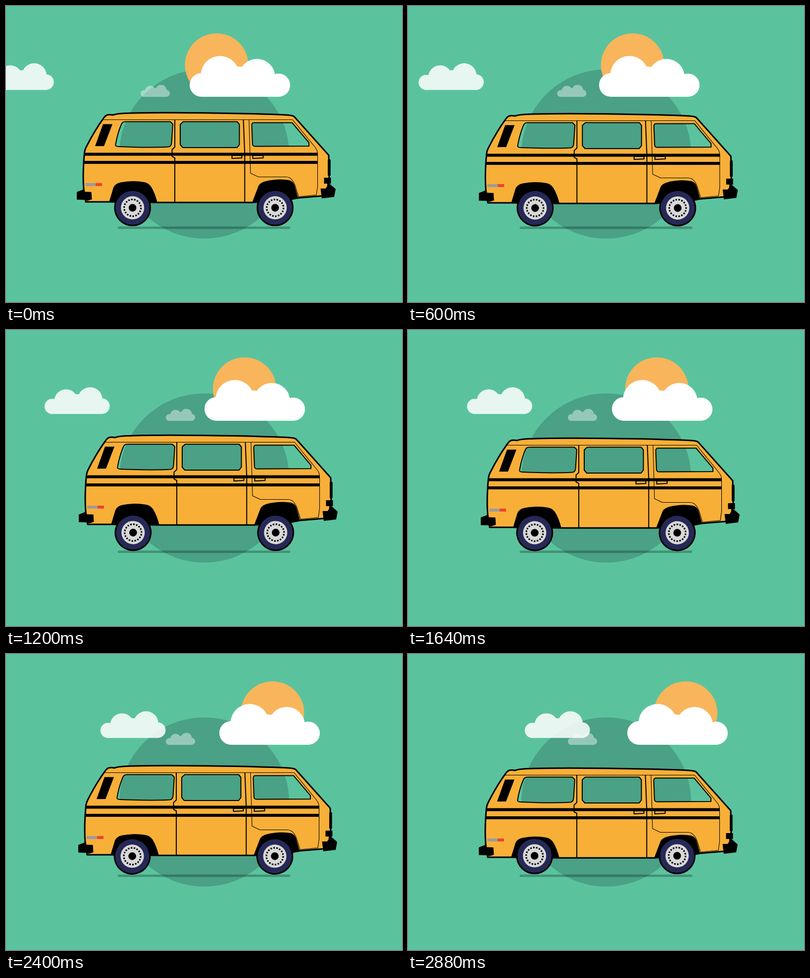
Write an HTML page that moves like this. It is 800 px wide and 600 px high and loops after 2920 ms.

```html
<!DOCTYPE html>
<html lang="en">
<head>
<meta charset="utf-8">
<title>Van ride</title>
<style>
  html, body { margin: 0; width: 100%; height: 100%; overflow: hidden; background: #5ac39e; }
  svg { display: block; width: 800px; height: 600px; }
  .line { fill: none; stroke: #000; stroke-width: 2; stroke-linejoin: round; }
  .thin { stroke-width: 1.1; }
  .bold { stroke-width: 3; }
</style>
</head>
<body>
<svg viewBox="0 0 800 600">
  <defs>
    <g id="puff">
      <rect x="15" y="25" width="101.500" height="29.500" rx="0"/>
      <circle cx="15.300" cy="39.200" r="15.300"/>
      <circle cx="43.500" cy="28.500" r="24"/>
      <circle cx="92" cy="25.300" r="25"/>
      <circle cx="115.700" cy="38.600" r="15.900"/>
      <rect x="55" y="14.500" width="25" height="30"/>
    </g>
    <g id="wheel">
      <circle r="35.800" fill="#262956" stroke="#000" stroke-width="3"/>
      <circle r="23.500" fill="#d8d8d8"/>
      <circle r="17" fill="none" stroke="#000" stroke-width="3.200" pathLength="108" stroke-dasharray="3.200 2.800"/>
      <circle r="7.800"/>
    </g>
  </defs>

  <circle cx="400.500" cy="300" r="171.500" fill="#4aa186"/>
  <circle id="sun" cy="119.500" r="64" fill="#f8b55b"/>
  <g id="bigCloud" fill="#fff">
    <rect x="24" y="150" width="156" height="34"/>
    <circle cx="24" cy="160" r="24"/>
    <circle cx="61.300" cy="140" r="38.800"/>
    <circle cx="136" cy="144" r="36.800"/>
    <circle cx="179.500" cy="160.500" r="23.500"/>
    <path d="M80 123L98 122.500L120 125V160H80Z"/>
  </g>
  <g id="paleCloud" fill="#fff" opacity=".86"><use href="#puff"/></g>
  <g id="tinyCloud" fill="#fff" opacity=".42"><use href="#puff" transform="scale(.449)"/></g>

  <path d="M228 449.500H572" stroke="#000" stroke-opacity=".25" stroke-width="5" stroke-linecap="round"/>

  <g id="van">
    <path id="shell" fill="#f7af38" fill-rule="evenodd"/>
    <path id="outline" class="line bold"/>
    <path d="M208 398L217 368Q220 360 232 357.500Q256 353 279 357Q287 358 293 366Q301 379 306 399Z"/>
    <path d="M497 399L510 365Q513 358 525 355Q550 349 572 353Q580 355 583 364L590 389L575 392Z"/>
    <path id="glass" class="line"/>
    <path class="line thin" d="M195 230.500H579L625 287Q629.500 292 629.500 302V365L627 383L591 386.500L584 364Q578 347 566 346.500H510L494 339L491 231"/>
    <path class="line" d="M341 230V286L335.500 291V305L341 308V398M479.500 230L482.300 300V398"/>
    <path d="M158 300.500H630M157 317H630" stroke="#000" stroke-width="6"/>
    <path class="line" d="M456.500 303H476.500V308L456.500 309ZM498.500 303H519.500V308L498.500 309Z"/>
    <path d="M196 239.500H215L198 284H180Z"/>
    <path d="M160 359H181V365H160Z" fill="#9c9c9c"/>
    <path d="M181 359H194V365H181Z" fill="#f0432f"/>
    <path d="M143 377L156 372L158 376.500L172.500 377L173.500 392L164 395L160 393L143 392.500Z"/>
    <path d="M635.500 370H649L649 360H653.500L666 371L663 387L638 390Z"/>
    <path d="M642.500 348H656.500V360H642.500Z"/>
    <rect x="650" y="310.500" width="5.700" height="34" rx="2"/>
  </g>
  <use href="#wheel" class="wheel"/>
  <use href="#wheel" class="wheel"/>
</svg>
<script>
  const LOOP = 2920, STEP = 40, TURN = 2880;
  const get = id => document.getElementById(id);

  const hull = 'M161 397L157 371Q154.500 340 158.500 297Q159 292 162 286Q178 254 196 229Q201 221 206 220.500Q211 220 216 221Q224 218 240 217.500Q300 215.500 400 216.800Q500 218 560 220.500Q578 221 582 224L652 302.500L653 345L650 366L638 385L590 389L575 392L498 398.300H306L208 397Z';
  const windows = 'M241 234.500H332L337 239.500L334.500 277Q334 285 328 285.500Q290 287.500 228 285Q220 285 221.500 280Q225 259 233 240Q235 234.500 241 234.500Z'
    + 'M358 234.500H467L471.500 240V281L467 287H357L352 281V240Z'
    + 'M500 236.500H578L612 277V284L503 284.500Q498.500 284.500 498 280L496.500 241Q497 237 500 236.500Z';
  get('shell').setAttribute('d', hull + windows);
  get('outline').setAttribute('d', hull);
  get('glass').setAttribute('d', windows);

  // [time, offset] keys for the van's sway and bounce
  const sway = [[0, 0], [360, 0], [840, 1], [1200, 4], [1420, 6.6], [1640, 4], [2400, 3], [2800, 1], [2880, 0]];
  const bounce = [[0, 0], [360, -1], [840, 4], [1200, -3], [1640, 3], [2400, 10], [2880, 15]];

  // Smooth curve through the keys
  function curve(keys, t) {
    const last = keys.length - 1;
    if (t >= keys[last][0]) return keys[last][1];
    const i = keys.findIndex((k, n) => t < keys[n + 1][0]);
    const slope = n => {
      const a = keys[Math.max(n - 1, 0)], b = keys[Math.min(n + 1, last)];
      return (b[1] - a[1]) / (b[0] - a[0]);
    };
    const [t0, v0] = keys[i], [t1, v1] = keys[i + 1];
    const d = t1 - t0, u = (t - t0) / d, w = 1 - u;
    return v0 * w * w * (1 + 2 * u) + v1 * u * u * (3 - 2 * u)
      + d * u * w * (slope(i) * w - slope(i + 1) * u);
  }

  const move = (el, x, y, extra = '') => el.setAttribute('transform', `translate(${x} ${y})${extra}`);
  const wheels = [...document.querySelectorAll('.wheel')];

  function draw(t) {
    get('sun').setAttribute('cx', 425.5 + 135.5 * t / TURN);
    move(get('bigCloud'), 371 + 72 * t / TURN, 0);
    move(get('paleCloud'), -35 + 271 * t / TURN, 115.7);
    move(get('tinyCloud'), 272 + 51 * Math.min(t / 1040, 1), 159.7);
    move(get('van'), curve(sway, t), curve(bounce, t));
    // Wheels turn slightly off their centre
    const spin = 360 * t / TURN;
    wheels.forEach((el, i) => move(el, 256 + 288 * i, 410, ` rotate(${spin}) translate(-.34 -.94)`));
  }

  const start = performance.now();
  function tick() {
    const t = (performance.now() - start) % LOOP;
    draw(Math.floor(t / STEP) * STEP);
    requestAnimationFrame(tick);
  }
  draw(0);
  requestAnimationFrame(tick);
</script>
</body>
</html>
```
